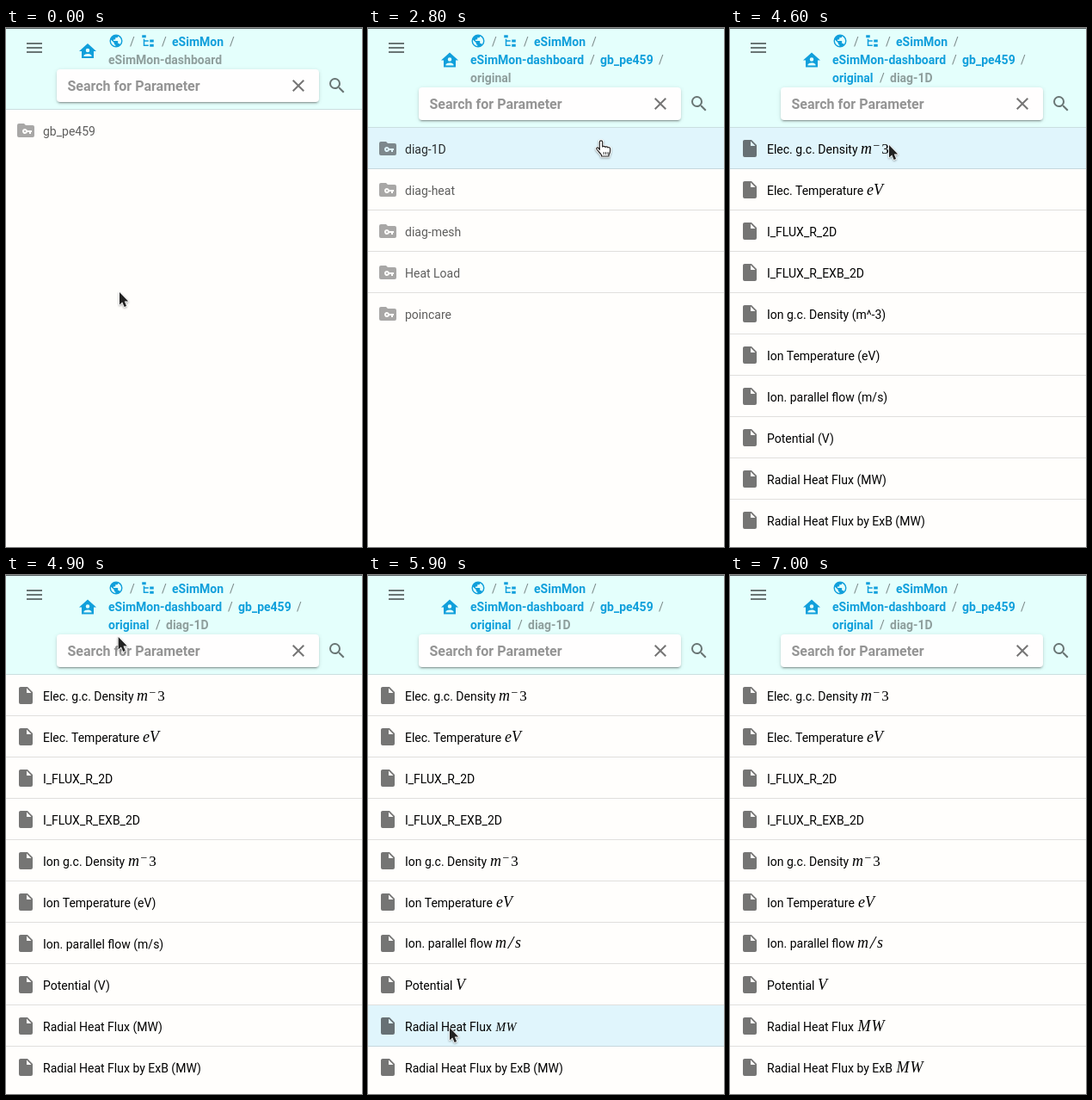
An HTML page that plays this animation: 414x603 px, repeating every 7400 ms.

```html
<!DOCTYPE html>
<html lang="en">
<head>
<meta charset="utf-8">
<title>Parameter browser</title>
<style>
  html, body { margin: 0; width: 100%; height: 100%; overflow: hidden; background: #fffefc; }
  #header { position: absolute; top: 0; left: 0; right: 0; box-sizing: border-box;
    background: #e4fffc; border-top: 1px solid #566060; border-bottom: 1px solid #cadfe0; }
  #card { position: absolute; left: 59px; width: 305px; height: 38px; border-radius: 4px; background: #fffefe;
    box-shadow: 0 3px 1px -2px rgba(0,0,0,.2), 0 2px 2px rgba(0,0,0,.14), 0 1px 5px rgba(0,0,0,.12); }
  svg { position: absolute; top: 0; left: 0; font: 14px Roboto, sans-serif; }
  .crumb { font-weight: 700; fill: #109fdb; }
  .crumb.last { fill: #8e9e9c; }
  .slash { fill: #7c8a89; }
  .search { font-size: 16px; font-weight: 700; fill: #949494; }
  .math { font-family: "Liberation Serif", "Times New Roman", serif; font-style: italic; }
  .upright { font-style: normal; }
</style>
</head>
<body>
<div id="header"></div>
<div id="card"></div>
<svg id="stage" width="414" height="603" viewBox="0 0 414 603"></svg>
<script>
const LOOP = 7400, STEP = 100, ROW = 48;
const BLUE = '#109fdb', GREY = 'rgba(0,0,0,.54)';
const header = document.getElementById('header');
const card = document.getElementById('card');
const stage = document.getElementById('stage');

const ICONS = {
  menu: 'M3 6H21V8H3zM3 11H21V13H3zM3 16H21V18H3z',
  earth: 'M17.9 17.39C17.64 16.59 16.89 16 16 16H15V13A1 1 0 0 0 14 12H8V10H10A1 1 0 0 0 11 9V7H13A2 2 0 0 0 15 5V4.59C17.93 5.77 20 8.64 20 12C20 14.08 19.2 15.97 17.9 17.39M11 19.93C7.05 19.44 4 16.08 4 12C4 11.38 4.08 10.78 4.21 10.21L9 15V16A2 2 0 0 0 11 18M12 2A10 10 0 0 0 12 22A10 10 0 0 0 12 2Z',
  tree: 'M3 3H9V7H3zM15 10H21V14H15zM15 17H21V21H15zM13 13H7V18H13V20H5V9H7V11H13z',
  home: 'M12 3L2 12H5V20H19V12H22zM12 8.75A2.25 2.25 0 0 1 12 13.25A2.25 2.25 0 0 1 12 8.75M12 15C13.5 15 16.5 15.75 16.5 17.25V18H7.5V17.25C7.5 15.75 10.5 15 12 15Z',
  close: 'M19 6.41L17.59 5L12 10.59L6.41 5L5 6.41L10.59 12L5 17.59L6.41 19L12 13.41L17.59 19L19 17.59L13.41 12z',
  search: 'M9.5 3A6.5 6.5 0 0 1 16 9.5C16 11.11 15.41 12.59 14.44 13.73L14.71 14H15.5L20.5 19L19 20.5L14 15.5V14.71L13.73 14.44C12.59 15.41 11.11 16 9.5 16A6.5 6.5 0 0 1 9.5 3M9.5 5A4.5 4.5 0 0 0 9.5 14A4.5 4.5 0 0 0 9.5 5Z',
  folder: 'M20 6H12L10 4H4A2 2 0 0 0 2 6V18A2 2 0 0 0 4 20H20A2 2 0 0 0 22 18V8A2 2 0 0 0 20 6M19 14H18V16H16V14H13.83A3 3 0 1 1 13.83 12H19zM11 12A1 1 0 0 0 11 14A1 1 0 0 0 11 12Z',
  file: 'M13 9V3.5L18.5 9M6 2C4.89 2 4 2.89 4 4V20A2 2 0 0 0 6 22H18A2 2 0 0 0 20 20V8L14 2Z'
};

const ARROW = 'M0 0V14.5L3.3 11.5L5.6 17L8.1 16L5.8 10.6H10.2Z';
const HAND = 'M-1.7 10.5V1.5a1.7 1.7 0 0 1 3.4 0V7c.4-1 3-1 3.2.3c.6-.8 2.8-.6 3 .6c.8-.7 2.7-.2 2.7 1.3V12c0 2-1 3-1.6 4.5V18H.5V16.5C-1 14.5-3.5 12-5 10c-1-1.6.8-2.6 2-1.6Z';

// text, x, line, x and line of the slash in front
const CRUMBS = [
  ['eSimMon', 193, 0, 181, 0],
  ['eSimMon-dashboard', 119, 1, 260, 0],
  ['gb_pe459', 270, 1, 258, 1],
  ['original', 119, 2, 338, 1],
  ['diag-1D', 186, 2, 174, 2]
];

// Formula glyphs: character, offset, rise, size, upright
const FORMULAS = {
  'm^-3': [['m', 0, 0, 18], ['−', 14.5, 5.5, 14, 1], ['3', 24.3, 0, 17, 1]],
  'eV': [['e', 0, 0, 18], ['V', 8, 0, 18]],
  'm/s': [['m', 0, 0, 18], ['/', 15, -1, 22], ['s', 23, 0, 18]],
  'V': [['V', -1, 0, 18]],
  'MW': [['M', 0.5, 0, 18], ['W', 16.5, 0, 18]]
};

// label, unit, formula x, time of the small preview, time of the final setting
const FILES = [
  ['Elec. g.c. Density', 'm^-3', 152, 4200, 4300],
  ['Elec. Temperature', 'eV', 159, 4400, 4600],
  ['I_FLUX_R_2D'],
  ['I_FLUX_R_EXB_2D'],
  ['Ion g.c. Density', 'm^-3', 142, 4800, 4900],
  ['Ion Temperature', 'eV', 149, 5100, 5200],
  ['Ion. parallel flow', 'm/s', 148, 5400, 5500],
  ['Potential', 'V', 103, 5600, 5700],
  ['Radial Heat Flux', 'MW', 148, 5900, 6000],
  ['Radial Heat Flux by ExB', 'MW', 193, 6100, 6200]
];
const FOLDERS = ['diag-1D', 'diag-heat', 'diag-mesh', 'Heat Load', 'poincare'];

// Pointer path: time, x, y
const PATH = [
  [0, 132, 307], [600, 132, 307], [1100, 65, 125], [1800, 65, 125], [2100, 271, 131],
  [3200, 271, 131], [3300, 262, 150], [3500, 225, 265], [3700, 185, 136], [4600, 185, 136],
  [4700, 172, 124], [5000, 110, 46], [5300, 92, 140], [5400, 93, 194], [5700, 94, 420],
  [5900, 95, 526], [6000, 96, 536], [6100, 98, 572], [6400, 98, 572], [6500, 97, 560], [6800, 19, 47]
];

function pointerAt(t) {
  const i = PATH.findIndex(k => k[0] > t);
  if (i < 0) return PATH[PATH.length - 1].slice(1);
  const [t0, x0, y0] = PATH[i - 1], [t1, x1, y1] = PATH[i];
  const p = (t - t0) / (t1 - t0);
  return [x0 + (x1 - x0) * p, y0 + (y1 - y0) * p];
}

const icon = (name, x, y, fill, size = 24) =>
  `<path d="${ICONS[name]}" fill="${fill}" fill-rule="evenodd" transform="translate(${x} ${y}) scale(${size / 24})"/>`;

const text = (s, x, y, cls = '') => `<text x="${x}" y="${y}" class="${cls}">${s}</text>`;

function drawFormula(unit, x, y, small) {
  const k = small ? 14 / 18 : 1;
  return FORMULAS[unit].map(([c, dx, rise, size, upright]) =>
    `<text x="${x + dx * k}" y="${y - rise * k}" font-size="${size * k}" class="math ${upright ? 'upright' : ''}">${c}</text>`
  ).join('');
}

function drawHeader(level, top) {
  let out = icon('menu', 21, 11, GREY) + icon('home', 83, top > 95 ? 25.5 : 15, BLUE)
    + icon('earth', 119, 6, BLUE, 18) + icon('tree', 156, 6, BLUE, 18) + text('/', 144, 21, 'slash');
  CRUMBS.slice(0, level + 1).forEach(([s, x, line, sx, sLine], i) => {
    out += text('/', sx, 21 + 21 * sLine, 'slash')
      + text(s, x, 21 + 21 * line, i === level ? 'crumb last' : 'crumb');
  });
  return out + text('Search for Parameter', 71.5, top - 22, 'search')
    + icon('close', 328, top - 40, GREY) + icon('search', 373, top - 40, GREY);
}

function drawLabel(row, y, t) {
  const [label, unit, x, preview, final] = row;
  if (!unit) return text(label, 43, y);
  if (t < preview) return text(`${label} (${unit})`, 43, y);
  const small = t < final;
  const base = unit === 'm/s' && !small ? y - 1 : y;
  return text(label, 43, base) + drawFormula(unit, x, base, small);
}

function drawRows(rows, kind, top, hover, loading, t) {
  return rows.map((row, i) => {
    const y = top + ROW * i, on = i === hover;
    const opacity = loading ? (on ? 0.82 : 0.63) : 1;
    return (on ? `<rect y="${y}" width="414" height="${ROW}" fill="#e0f5fc"/>` : '')
      + (i < rows.length - 1 ? `<rect y="${y + ROW - 1}" width="414" height="1" fill="rgba(0,0,0,.12)"/>` : '')
      + `<g opacity="${opacity}">${icon(kind, 11, y + 12, GREY)}${drawLabel(row, y + 30, t)}</g>`;
  }).join('');
}

function drawPointer([x, y], hand) {
  const shape = hand
    ? `<path d="${HAND}" fill="#fff" stroke="#fff" stroke-width="3"/><path d="${HAND}" fill="#fff" stroke="#222" stroke-width="1.2"/>
       <path d="M3.2 13V16M5.6 13V16M8 13V16" stroke="#222" stroke-width=".9"/>`
    : `<path d="${ARROW}" fill="#222" stroke="#fff" stroke-width="1.6" paint-order="stroke"/>`;
  return `<g transform="translate(${x} ${y})" stroke-linejoin="round" style="filter:drop-shadow(.5px 1px .8px rgba(0,0,0,.35))">${shape}</g>`;
}

function render(t) {
  const level = t < 1500 ? 1 : t < 2800 ? 2 : t < 4100 ? 3 : 4;
  const top = level < 3 ? 95 : 116;
  const files = t >= 4100;
  const rows = files ? FILES
    : (t < 1500 ? ['gb_pe459'] : t < 2600 ? ['original'] : FOLDERS).map(s => [s]);
  const loading = t < 1000 || (t >= 2000 && t < 4100);
  const rowAt = y => {
    const i = Math.floor((y - top) / ROW);
    return i < rows.length ? i : -1;
  };
  const pointer = pointerAt(t);
  // Rows react one step ahead of the drawn pointer
  const hover = rowAt(pointerAt(t + STEP)[1]);

  header.style.height = top + 'px';
  card.style.top = top - 47 + 'px';
  stage.innerHTML = drawHeader(level, top)
    + drawRows(rows, files ? 'file' : 'folder', top, hover, loading, t)
    + (t < 7000 ? drawPointer(pointer, !files && rowAt(pointer[1]) >= 0) : '');
}

const start = performance.now();
let shown = -1;
function tick() {
  const t = Math.floor((performance.now() - start) % LOOP / STEP) * STEP;
  if (t !== shown) render(shown = t);
  requestAnimationFrame(tick);
}
tick();
</script>
</body>
</html>
```
